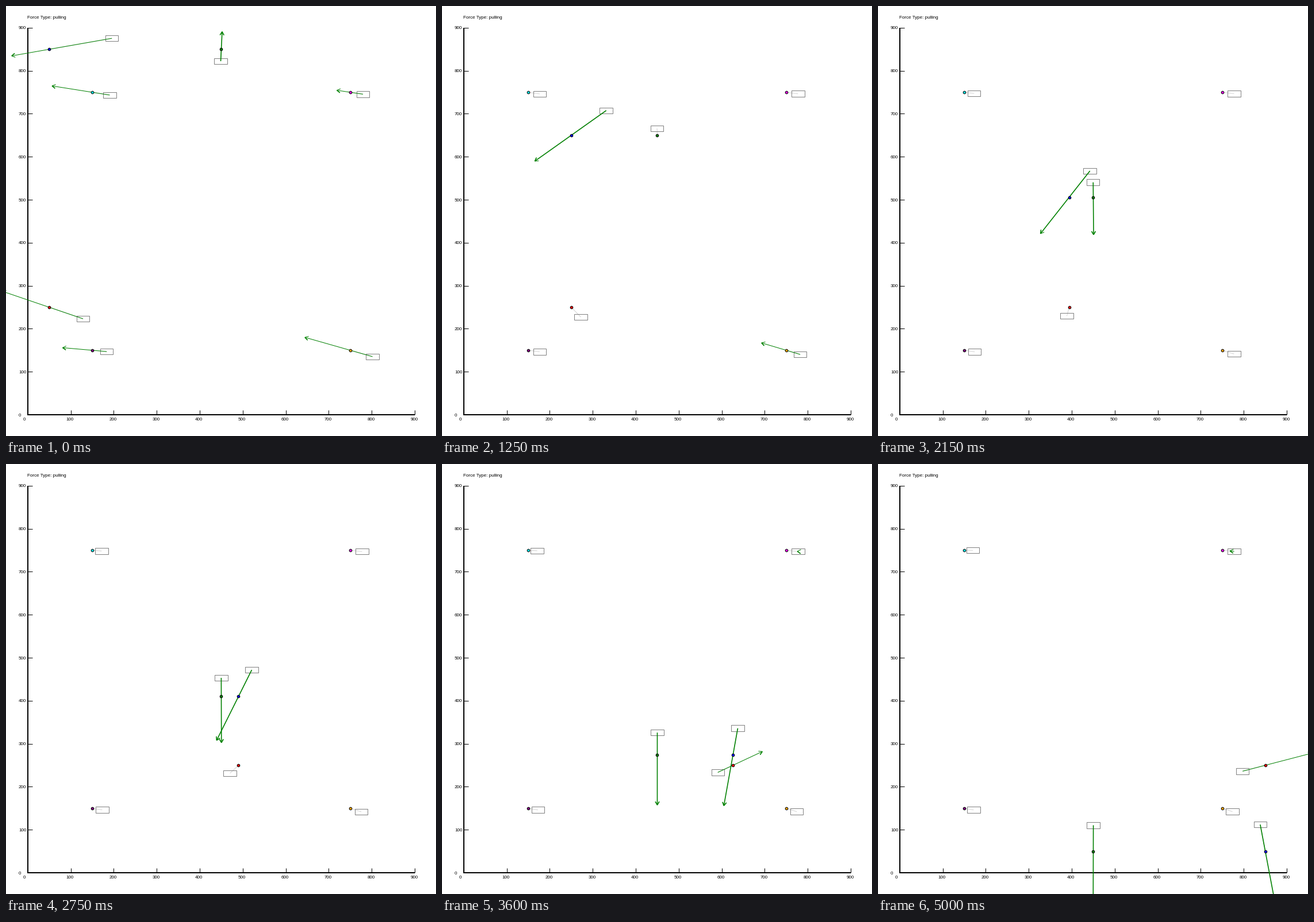
Recreate the animation shown at these times as a matplotlib script. Size 748 px wide and 748 px high, loop 5050 ms.

```python
import math
import numpy as np
import matplotlib.pyplot as plt
from matplotlib.animation import FuncAnimation
from matplotlib.patches import Rectangle

SIZE, DPI = 748, 100
FRAMES, STEP = 101, 50
PX = 72 / DPI                      # one pixel in points
SCALE = SIZE / 1000                # map runs from -50 to 950 both ways
BOX = np.array([22.4, 10.5])

plt.rcParams["font.family"] = "Liberation Sans"
fig = plt.figure(figsize=(SIZE / DPI, SIZE / DPI), dpi=DPI, facecolor="white")
ax = fig.add_axes([0, 0, 1, 1])
ax.set_xlim(-0.5, SIZE - 0.5)
ax.set_ylim(SIZE - 0.5, -0.5)
ax.axis("off")


def to_px(x, y):
    return SCALE * np.array([x + 50, 950 - y])


def line(xs=(), ys=(), color="black", width=1, z=1):
    return ax.plot(xs, ys, color=color, lw=width * PX, zorder=z,
                   solid_capstyle="butt")[0]


def text(x, y, s, ha="center"):
    ax.text(x, y, s, ha=ha, va="center_baseline", fontsize=8 * PX, color="black")


def draw_axes():
    left, base = to_px(0, 0)
    end, top = to_px(900, 900)
    line([left, left], [top, base + 1], width=2)
    line([left - 1, end], [base, base], width=2)
    for v in range(0, 901, 100):
        x, y = to_px(v, v)
        if v:
            line([x, x], [base - 8, base])
            line([left, left + 8], [y, y])
        text(x - 1.2 if v else 31, 718, str(v))
        text(21.5, y, str(v), ha="left")
    text(37, 19.5, "Force Type: pulling", ha="left")


def glide(n, start, rest, tau, drift=0):
    """Settle from start to rest, with an optional slow drift."""
    return rest + (start - rest) * math.exp(-n / tau) + drift * n


def pull(rel):
    """Arrow length, growing with the log of the free gap."""
    gx, gy = np.maximum(np.abs(rel) - (7, BOX[1] / 2), 0)
    gap = (gx ** 4 + gy ** 4) ** 0.25
    return 20 + 35 * math.log(gap - 13) if gap > 13 else 0


class Feature:
    """A map point with a label box; x and y hold the label's glide values."""

    def __init__(self, color, start, end, x, y):
        self.start, self.end = to_px(*start), to_px(*end)
        self.x, self.y = x, y
        self.leader = line(color="lightgray", z=1)
        self.box = Rectangle((0, 0), *BOX, fill=False, ec="gray", lw=PX, zorder=2)
        ax.add_patch(self.box)
        self.arrow = [line(color="green", z=3) for _ in range(3)]
        self.dot = ax.plot([], [], "o", color=color, ms=4.6 * PX, mec="black",
                           mew=PX, zorder=4)[0]

    def update(self, n):
        pos = self.start + (self.end - self.start) * n / (FRAMES - 1)
        rel = np.array([glide(n, *self.x), glide(n, *self.y)])
        label = pos + rel
        self.dot.set_data([pos[0]], [pos[1]])
        self.leader.set_data(*zip(label, pos))
        self.box.set_xy(label - BOX / 2)

        force = pull(rel)
        for part in self.arrow:
            part.set_visible(force > 0)
        if force <= 0:
            return
        way = -rel / np.hypot(*rel)
        tip = label + force * way
        side = np.array([-way[1], way[0]])
        tails = [label, tip - 6 * way + 3.5 * side, tip - 6 * way - 3.5 * side]
        for part, tail in zip(self.arrow, tails):
            dx, dy = np.abs(tip - tail)
            part.set_data(*zip(tail, tip))
            part.set_linewidth((1.6 if dy > 0.5 * dx else 1) * PX)


draw_axes()
features = [
    Feature("blue", (50, 850), (850, 50), (108.9, -40, 64), (-19.1, -46.5, 12)),
    Feature("green", (450, 850), (450, 50), (-1, 0.2, 40), (20.7, -52, 42)),
    Feature("red", (50, 250), (850, 250), (58.7, -60, 57), (20, 0, 150)),
    Feature("cyan", (150, 750), (150, 750), (30.3, 14.8, 23), (4.8, -1, 60)),
    Feature("magenta", (750, 750), (750, 750), (22.1, 20.3, 6, 0.004), (3.3, 1.5, 50)),
    Feature("purple", (150, 150), (150, 150), (25.1, 16, 28), (2.2, 3, 60)),
    Feature("orange", (750, 150), (750, 150), (38.6, 17.4, 22), (11, 5.7, 20)),
]


def update(n):
    for f in features:
        f.update(n)
    return []


anim = FuncAnimation(fig, update, frames=FRAMES, interval=STEP,
                     init_func=lambda: update(0), repeat=True, repeat_delay=0,
                     blit=False)
plt.show()
```
